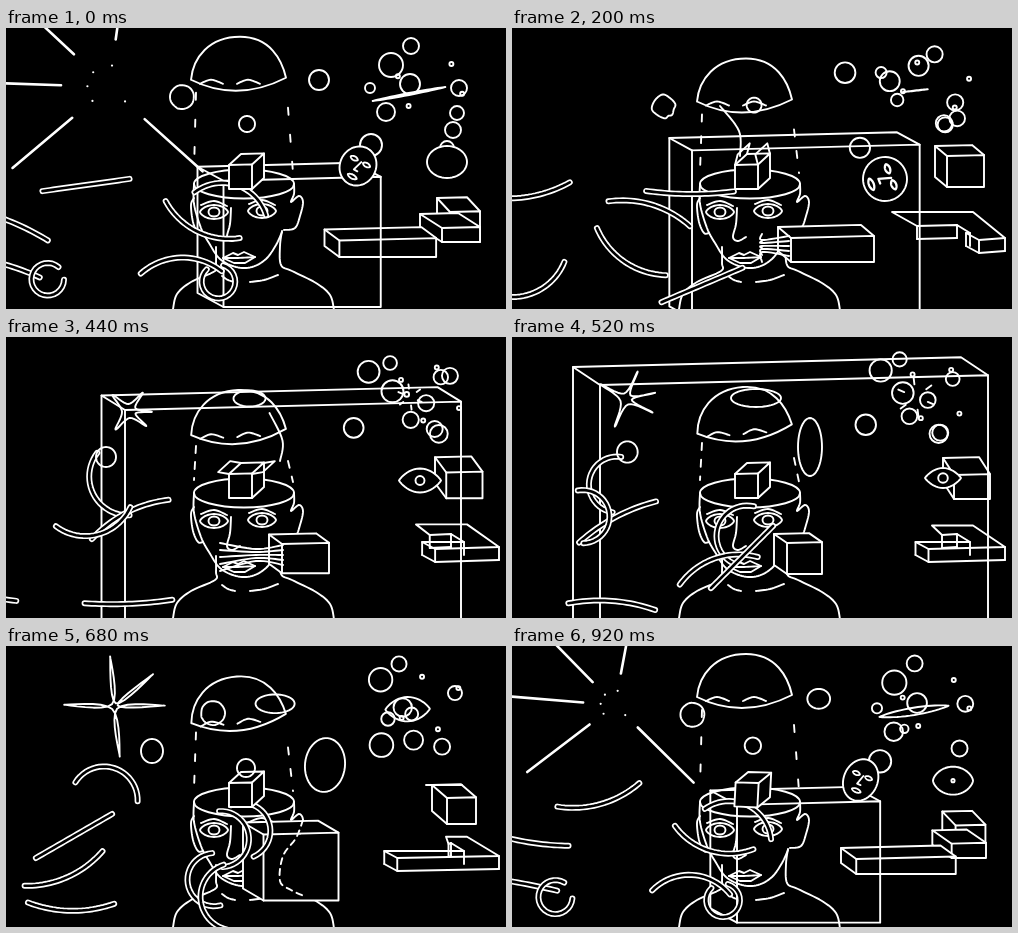
Recreate the animation shown at these times as an HTML page with a canvas. Size 500 px wide and 281 px high, loop 0.96 s.

```html
<!DOCTYPE html>
<html>
<head>
<meta charset="utf-8">
<style>
html, body { margin: 0; height: 100%; overflow: hidden; background: #000 }
canvas { display: block }
</style>
</head>
<body>
<canvas id="stage" width="500" height="281"></canvas>
<script>
const g = document.getElementById('stage').getContext('2d');
const LOOP = 24, STEP_MS = 40;
const { sin, cos, PI, max, min, exp } = Math;
const RAD = PI / 180;
let step = 0;

function ink(width = 1.9, color = '#fff') {
  g.lineWidth = width;
  g.strokeStyle = color;
  g.stroke();
}

function poly(p, closed) {
  g.beginPath();
  for (let i = 0; i < p.length; i += 2) g.lineTo(p[i], p[i + 1]);
  if (closed) g.closePath();
}

// Catmull-Rom blend of four poses
const blend = (a, b, c, d, k) => b.map((v, j) =>
  v + k / 2 * (c[j] - a[j] + k * (2 * a[j] - 5 * v + 4 * c[j] - d[j] + k * (3 * (v - c[j]) + d[j] - a[j]))));

function sample(points, u, closed) {
  const n = points.length, i = Math.floor(u);
  const pick = j => points[closed ? (j + n) % n : max(0, min(n - 1, j))];
  return blend(pick(i - 1), pick(i), pick(i + 1), pick(i + 2), u - i);
}

function curve(p, closed) {
  const points = [], out = [];
  for (let i = 0; i < p.length; i += 2) points.push([p[i], p[i + 1]]);
  const end = closed ? points.length : points.length - 1;
  for (let u = 0; u <= end - 0.1; u += 1 / 8) out.push(...sample(points, u, closed));
  if (!closed) out.push(...points[end]);
  poly(out, closed);
}

const line = (...p) => { poly(p); ink(); };
const stroke = (...p) => { curve(p); ink(); };

function oval(x, y, rx, ry = rx) {
  g.beginPath();
  g.ellipse(x, y, max(0, rx), max(0, ry), 0, 0, 7);
  ink();
}

// Keys are [step, ...pose]; a track longer than a loop overlaps itself.
function track(draw, ...keys) {
  for (let s = step; s < keys[keys.length - 1][0]; s += LOOP) {
    const i = keys.findIndex(key => key[0] > s);
    if (i < 1) continue;
    const [t0, ...a] = keys[i - 1], [t1, ...b] = keys[i];
    const k = (s - t0) / (t1 - t0);
    draw(a.map((v, j) => v + (b[j] - v) * k), s);
  }
}

// Bubbles follow [x, y, r] points that lie `gap` steps apart.
function drift(start, gap, points, closed) {
  const life = closed ? LOOP : gap * (points.length - 1);
  const first = (step - start + LOOP) % LOOP;
  for (let s = first; s < life; s += LOOP) oval(...sample(points, s / gap, closed));
}

// Front rectangle l, t, r, b and the offset of the far edge
function box([l, t, r, b, dx, dy]) {
  const tr = t - (r - l) * 0.025;
  const [sx, st] = dx < 0 ? [l, t] : [r, tr];
  const far = [l + dx, t + dy, r + dx, tr + dy];
  const side = [sx + dx, st + dy, sx + dx, b + dy, sx, b];
  if (b < 260) {
    g.fillRect(l, t, r - l, b - t);
    poly([l, t, ...far, r, tr], true); g.fill();
    poly([sx, st, ...side], true); g.fill();
  }
  poly([l, t, r, tr, r, b, l, b], true); ink();
  line(l, t, ...far, r, tr);
  line(...side);
}

// Notched brick whose front bar grows to the left while the back wears away
function notchedBrick([k]) {
  const h = 13, x = 467 - 101 * k;
  const p = [380 + 80 * k, 184 + 9 * k, 461, 184 + 9 * k, 493, 210, x, 212,
    x - 13, 205, 458, 205, 445, 197, 405 + 50 * k, 198];
  poly(p, true); ink();
  for (let i = 4; i < p.length; i += 2) line(p[i], p[i + 1], p[i], p[i + 1] + h);
  line(493, 210 + h, x, 212 + h, x - 13, 205 + h);
  line(445, 197 + h, p[14], 198 + h);
}

// Round for pinch 0, eye-shaped for pinch near 1
function blobPath([x, y, rx, ry, pinch = 0, tilt = 0]) {
  g.beginPath();
  for (let a = 0; a < 2 * PI; a += PI / 24) {
    const u = rx * cos(a), v = ry * sin(a) * Math.abs(sin(a)) ** pinch;
    g.lineTo(x + u * cos(tilt) - v * sin(tilt), y + u * sin(tilt) + v * cos(tilt));
  }
  g.closePath();
}
const blob = p => { blobPath(p); ink(); };

function faceOrEye(p, s) {
  const [x, y, rx, ry, pinch, tilt] = p;
  blobPath(p); g.fill(); ink();
  if (pinch > 0.2) oval(x, y, min(6 * pinch, ry));
  else if (s > 19 && s < 32) {
    g.save();
    g.translate(x, y);
    g.rotate(tilt);
    g.scale(rx / 18, rx / 18);
    for (const side of [-1, 1]) { blob([7 * side, -5, 4, 2, 0.5]); }
    blob([0, 12, 5, 2, 0.5]);
    line(1, -5, -2, 5, 2, 5);
    g.restore();
  }
}

// Worm of fixed length, given its middle, heading and total bend in degrees
function worm([x, y, heading, bend]) {
  const n = 24, length = 88, p = [];
  let px = 0, py = 0, mx = 0, my = 0;
  for (let i = 0; i <= n; i++) {
    p.push(px, py);
    mx += px / (n + 1);
    my += py / (n + 1);
    const a = (heading + bend * (i / n - 0.5)) * RAD;
    px += length / n * cos(a);
    py += length / n * sin(a);
  }
  poly(p.map((v, i) => i % 2 ? v - my + y : v - mx + x));
  ink(6);
  ink(2.6, '#000');
}

// A ball grows arms, turns and flies apart as rays.
function burst([x, y], s) {
  const arms = [56, 154, 237, 292, 331], age = s - 45;
  const reach = max(12, 85 * 1.14 ** age);
  const spin = age < 0 ? -7 * age : -18 * (1 - exp(-age / 2));
  const spot = (a, r) => [x + r * cos((a + spin) * RAD), y + r * sin((a + spin) * RAD)];
  if (age < 0) {
    const core = min(12, -0.6 * age + 1);
    curve(arms.flatMap((a, i) => {
      const next = arms[i + 1] || arms[0] + 360;
      return [...spot(a, reach), ...spot((a + next) / 2, core)];
    }), true);
    ink();
    return;
  }
  for (const a of [196, ...arms.slice(0, age < 2 ? 5 : 4)]) {
    const gap = 16 * age;
    poly([...spot(a, gap), ...spot(a, reach)]); ink(2.6);
    poly([...spot(a, gap * 0.45), ...spot(a, gap * 0.45)]); ink(2.2);
  }
}

function cap() {
  const y = 49 + 45 * (1 + cos((step - 11) * PI / 12)) / 2;
  g.save();
  g.translate(233, y);
  g.rotate(-0.09 * max(0, sin((step - 9) * PI / 12)));
  g.beginPath();
  g.moveTo(-48, 2);
  g.bezierCurveTo(-46, -20, -30, -41, 1, -41);
  g.bezierCurveTo(31, -41, 43, -18, 47, 0);
  g.quadraticCurveTo(-2, 25, -48, 2);
  ink();
  for (const x of [-28, 9]) stroke(x - 11, 6, x, 2, x + 12, 6);
  g.restore();
  g.setLineDash([7, max(7, (130 - y) / 4)]);
  line(190, y + 15, 188, 143);
  line(282, y + 30, 287, 145);
  g.setLineDash([]);
}

function cube() {
  g.save();
  g.translate(235, 149);
  g.rotate(0.4 * exp(-(((step - 21) / 1.4) ** 2)));
  box([-12, -12, 11, 12, 12, -11]);
  if (step > 1 && step < 13) {
    const a = min(1, (step - 1) / 9) * 170 * RAD;
    for (const [x, dir] of [[-12, 1], [11, -1]]) {
      const dx = 11 * dir * cos(a), dy = -11 * sin(a);
      line(x, -12, x + dx, -12 + dy, x + 12 + dx, -23 + dy, x + 12, -23);
    }
  }
  g.restore();
}

function head() {
  oval(238, 156, 50, 14.5);
  stroke(188, 156, 188, 176, 195, 200, 203, 215, 214, 231, 230, 239, 246, 239, 260, 231, 270, 217, 276, 204);
  stroke(188, 170, 185, 177, 187, 194, 192, 205, 197, 205);
  stroke(288, 156, 288, 166, 285, 174, 293, 168, 297, 174, 294, 188, 289, 200, 278, 202);
  stroke(210, 219, 210, 235, 209, 243, 185, 254, 171, 266, 167, 281);
  stroke(276, 203, 274, 218, 275, 237, 286, 243, 310, 255, 324, 267, 328, 282);
  stroke(216, 248, 222, 252, 229, 254);
  stroke(244, 254, 258, 252, 272, 247);
  for (const [x, y] of [[208, 184], [256, 183]]) {
    blob([x, y, 14, 7, 0.4]);
    oval(x, y, 5.5, 4.5);
    stroke(x - 13, y - 7, x, y - 11, x + 13, y - 6);
  }
  stroke(225, 180, 224, 196, 221, 209, 226, 213, 234, 209);
  poly([217, 230, 227, 225, 232, 227, 238, 224, 249, 229, 239, 235, 228, 235], true); ink();
  stroke(217, 230, 232, 230, 249, 229);
}

function mouthStrands() {
  if (step < 5 || step > 12) return;
  const x = 250 - 9 * min(4, step - 5);
  for (let i = 0; i < 5; i++) stroke(x, 206 + 7 * i, 250, 212 + 3 * i, 277, 208 + 5 * i);
}

function boxes() {
  track(box, [5, 435, 128, 472, 159, -12, -10], [13, 442, 138, 478, 162, -11, -17],
    [17, 441, 152, 470, 178, -15, -13], [24, 444, 184, 474, 214, -13, -14], [29, 411, 198, 495, 212, -26, -14]);
  track(box, [21, 447, 193, 474, 208, -14, -12], [24, 436, 200, 474, 214, -22, -14], [29, 411, 198, 450, 212, -26, -14]);
  track(notchedBrick, [5, 0], [21, 1]);
}

function growingBox() {
  track(box, [21, 366, 214, 471, 226, -16, -11], [29, 279, 210, 362, 234, -13, -11],
    [37, 275, 206, 310, 237, -13, -9], [45, 240, 171, 355, 272, -28, -15],
    [57, 150, 98, 434, 300, -20, -11], [61, 88, 48, 476, 300, -27, -18], [65, 7, -10, 520, 300, -30, -20]);
  if (step > 14 && step < 20) {
    g.setLineDash([6, 5]);
    stroke(297, 174, 290, 192, 277, 210, 274, 235, 285, 244, 298, 250);
    g.setLineDash([]);
  }
}

function worms() {
  track(worm, [13, 216, 192, 107, -165], [17, 232, 192, 90, 180], [21, 213, 202, -5, -85], [24, 193, 199, 25, -70],
    [29, 139, 180, 18, 50], [33, 102, 162, 25, -80], [37, 88, 145, 95, -180], [41, 105, 131, 20, 150],
    [45, 104, 150, -35, -150], [48, 80, 157, -8, 0], [53, 16, 166, -10, -40], [57, -20, 168, 5, 0]);
  track(worm, [17, 252, 178, 70, 180], [24, 228, 164, 20, 110], [29, 178, 165, 0, -15], [33, 140, 174, -25, 55],
    [41, 68, 190, -30, 0], [45, 35, 195, -15, -95], [48, 2, 194, 22, 20], [53, -50, 190, 20, 0]);
  track(worm, [13, 204, 226, -18, 70], [17, 193, 236, -95, 190], [21, 189, 236, 15, 130], [24, 175, 235, 0, 80],
    [29, 115, 230, 33, -65], [33, 94, 204, 67, -15], [37, 86, 178, -100, -190], [41, 60, 228, -25, -50],
    [45, 22, 237, 0, -20], [48, -8, 236, 15, 20], [53, -50, 236, 15, 0]);
  track(worm, [13, 230, 220, -45, 0], [17, 204, 252, -90, 150], [21, 209, 258, -20, -300], [24, 213, 256, -20, -300],
    [29, 190, 257, -23, 0], [33, 145, 266, -10, -55], [37, 100, 266, 5, 30], [41, 65, 262, 0, -40],
    [45, 43, 253, 50, -270], [48, 40, 252, 60, -310], [53, 20, 259, -25, -90], [57, -17, 259, 5, 10], [61, -50, 260, 5, 0]);
}

function bubbles() {
  drift(0, 12, [[313, 52, 10], [366, 34, 11], [385, 37, 12], [438, 41, 7], [453, 60, 8], [428, 94, 8], [447, 102, 8],
    [401, 81, 8], [364, 60, 5], [386, 24, 7], [405, 18, 8], [446, 40, 8]]);
  drift(0, 12, [[451, 85, 7], [430, 97, 9], [380, 84, 9], [402, 56, 2]]);
  drift(0, 12, [[441, 120, 7], [418, 64, 8], [391, 84, 4]]);
  drift(0, 6, [[404, 56, 10], [375, 53, 10], [389, 55, 11], [398, 62, 9]], true);
  drift(0, 6, [[365, 117, 11], [346, 118, 10], [350, 88, 10], [378, 102, 12]], true);
  for (const phase of [-51, 19, 129, 199]) {
    const a = (phase + step * 7.5) * RAD;
    oval(424 + 34 * cos(a), 57 + 27 * sin(a), 2);
  }
  if (step > 7 && step < 16) {
    const r = 4 + 2.2 * max(0, step - 9);
    for (let a = 0.4; a < 6.5; a += PI / 3) {
      line(404 + r * cos(a), 60 + r * sin(a), 404 + 1.5 * r * cos(a), 60 + 1.5 * r * sin(a));
    }
  }
  // ball that rises from the cube and rolls over the cap
  track(blob, [15, 241, 130, 4, 4], [17, 240, 122, 9, 9], [24, 241, 96, 8, 8], [33, 243, 62, 7, 7],
    [37, 244, 61, 25, 9], [48, 313, 52, 10, 10]);
  track(blob, [11, 100, 120, 10, 10], [17, 146, 105, 11, 12], [21, 187, 65, 11, 11]);
  track(burst, [17, 207, 67], [24, 176, 69], [33, 132, 86], [37, 114, 62], [45, 103, 59], [50, 103, 59]);
}

function faces() {
  track(blob, [16, 402, 63, 20, 13, 0.7, 0], [21, 400, 64, 31, 9, 0.7, -0.1],
    [24, 403, 66, 37, 1, 0.7, -0.19], [30, 403, 62, 8, 0, 0.7, -0.1]);
  track(faceOrEye, [13, 298, 110, 12, 29, 0, 0], [17, 319, 119, 20, 27, 0, 0.1], [21, 342, 126, 15, 24, 0, 0.2],
    [24, 352, 138, 18, 20, 0, 0.5], [29, 373, 151, 22, 22, 0, 1.2], [33, 397, 146, 24, 14, 0.7, 0],
    [37, 431, 141, 18, 10, 0.8, 0], [41, 438, 139, 18, 0, 0.8, 0], [45, 441, 136, 20, 10, 0.8, 0],
    [48, 441, 134, 20, 16, 0, 0], [53, 447, 138, 25, 20, 0, 0]);
}

function frame() {
  step = Math.floor(performance.now() / STEP_MS) % LOOP;
  g.fillStyle = '#000';
  g.fillRect(0, 0, 500, 281);
  g.lineCap = g.lineJoin = 'round';
  boxes();
  cap();
  head();
  growingBox();
  mouthStrands();
  worms();
  cube();
  track(p => stroke(...p), [5, 208, 78, 227, 103, 228, 128], [9, 247, 76, 263, 102, 262, 124], [13, 280, 76, 290, 105, 286, 124]);
  bubbles();
  faces();
  requestAnimationFrame(frame);
}
frame();
</script>
</body>
</html>
```
